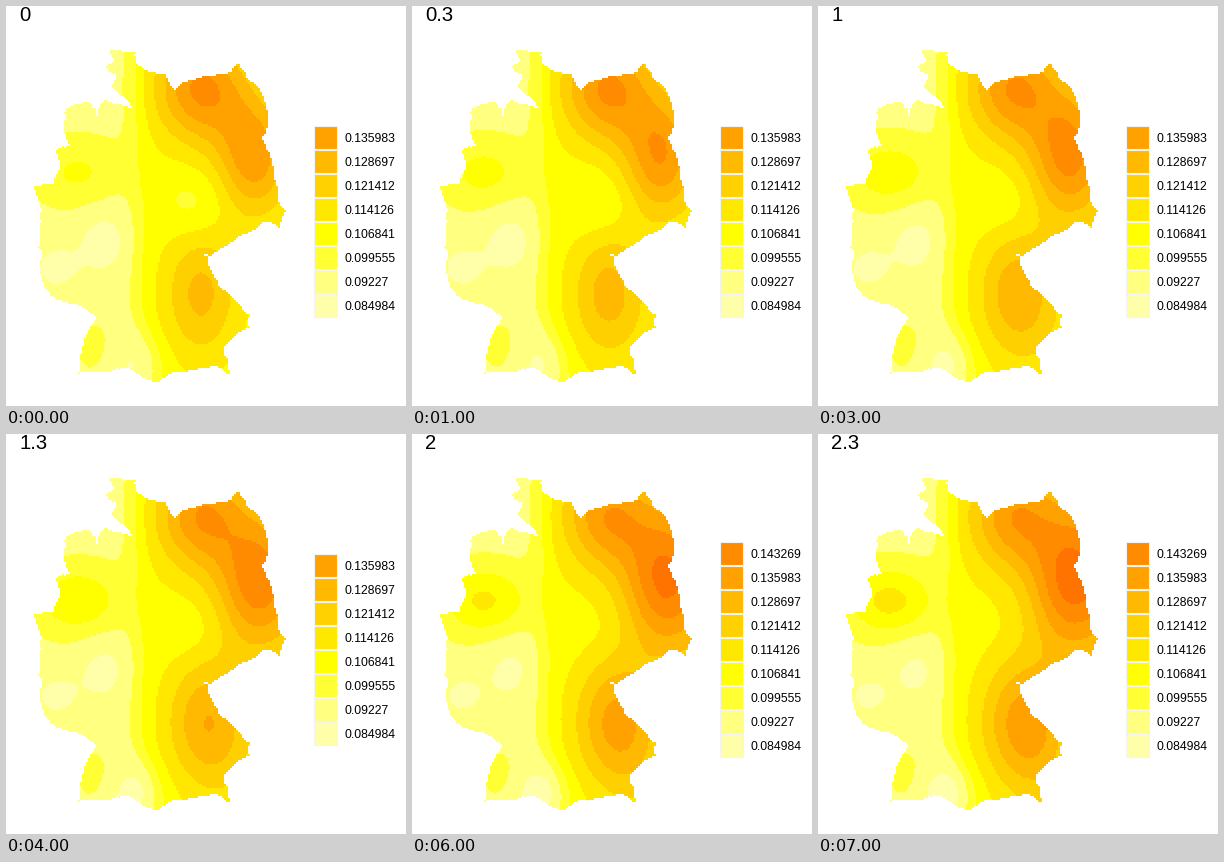
Recreate the animation shown at these times as a matplotlib script. Size 400x400 px, loop 8000 ms.

```python
import random

import matplotlib.pyplot as plt
import numpy as np
from matplotlib.animation import FuncAnimation
from matplotlib.colors import ListedColormap
from matplotlib.patches import Rectangle
from matplotlib.path import Path

SIZE, CELL = 400, 2
FRAMES = 8
LOWEST, HIGHEST = 0.084984, 0.135983
STEP = (HIGHEST - LOWEST) / 7

# Corners of the border, clockwise; the raggedness is generated
NORTH = [(102, 44), (129, 47), (131, 58), (143, 66), (160, 67), (163, 80),
         (169, 83), (183, 75), (197, 69), (222, 67), (233, 55), (240, 70),
         (254, 84)]
EAST = [(263, 120), (256, 132), (264, 150), (273, 197), (279, 205), (273, 222),
        (262, 215), (232, 231), (204, 251), (198, 247), (213, 281), (243, 309),
        (244, 321), (234, 326)]
SOUTH = [(217, 343), (224, 368), (212, 361), (165, 367), (150, 377), (118, 361),
         (103, 366), (73, 367)]
WEST = [(75, 342), (90, 311), (75, 300), (47, 292), (38, 282), (33, 262),
        (38, 250), (33, 240), (35, 206), (28, 181), (48, 177), (55, 160),
        (51, 144), (64, 140), (57, 118), (60, 102), (84, 97), (91, 109),
        (99, 94), (127, 102), (107, 82), (111, 70), (101, 61), (108, 56)]

# Hills and hollows: x, y, width, height, strength at the start and at the end
BUMPS = [
    (195, 82, 32, 38, 4.7, 4.0),
    (248, 150, 26, 42, 4.2, 2.6),
    (275, 140, 42, 70, 0.0, 3.9),
    (190, 198, 24, 24, -1.1, -0.2),
    (195, 288, 26, 45, 2.8, 2.8),
    (225, 305, 25, 55, 0.0, 2.2),
    (72, 167, 32, 25, 1.55, 2.75),
    (98, 235, 20, 26, -1.0, -0.8),
    (50, 262, 17, 17, -0.9, -0.75),
    (88, 342, 15, 22, 0.7, 0.7),
    (128, 358, 20, 18, -0.7, -1.2),
]

PALE = [170, 128, 51]


def band_color(level):
    if level < len(PALE):
        return 1, 1, PALE[level] / 255
    return 1, 1 - (level - 3) / 11, 0


def roughen(points, rng, amount):
    """Split every edge at a jittered midpoint."""
    out = []
    for (x0, y0), (x1, y1) in zip(points, points[1:] + points[:1]):
        out += [(x0, y0), ((x0 + x1) / 2 + rng.uniform(-amount, amount),
                           (y0 + y1) / 2 + rng.uniform(-amount, amount))]
    return out


def sigmoid(u):
    return 1 / (1 + np.exp(-u))


def field(x, y, progress):
    """Band level: a step from west to east plus the bumps."""
    edge = 131 + 20 * sigmoid((y - 325) / 12)
    level = 1.6 + 1.9 * sigmoid((x - edge) / 6)
    for cx, cy, w, h, start, end in BUMPS:
        strength = start + (end - start) * progress
        level += strength * np.exp(-((x - cx) / w) ** 2 / 2
                                   - ((y - cy) / h) ** 2 / 2)
    return level


rng = random.Random(4)
border = NORTH + EAST + SOUTH + WEST
for amount in (1.5, 1.2, 0.8):
    border = roughen(border, rng, amount)

axis = np.arange(CELL / 2, SIZE, CELL)
gx, gy = np.meshgrid(axis, axis)
cells = np.column_stack([gx.ravel(), gy.ravel()])
inside = Path(border + border[:1]).contains_points(cells).reshape(gx.shape)

fig = plt.figure(figsize=(4, 4), dpi=100, facecolor="white")
ax = fig.add_axes([0, 0, 1, 1])
ax.axis("off")

colors = [band_color(k) for k in range(10)]
image = ax.imshow(np.full(gx.shape, np.nan), cmap=ListedColormap(colors),
                  vmin=-0.5, vmax=9.5, interpolation="nearest",
                  extent=(0, SIZE, SIZE, 0))
ax.set(xlim=(0, SIZE), ylim=(SIZE, 0), aspect="auto")

title = ax.text(13.5, 15, "", family="Liberation Sans", size=20.3 * 0.72,
                va="baseline")
keys = []
for k in range(9):
    key = Rectangle((308, 0), 22.5, 23, fc=colors[k], ec="#f4f4ee", lw=0.8)
    ax.add_patch(key)
    label = ax.text(338.5, 0, f"{round(LOWEST + k * STEP, 6):g}",
                    family="Liberation Sans", size=12.2 * 0.72, va="baseline")
    keys.append((key, label))


def update(i):
    time = i / 3
    rows = 8 if time < 2 else 9
    level = np.clip(np.floor(field(gx, gy, i / (FRAMES - 1))), 0, rows)
    image.set_data(np.where(inside, level, np.nan))
    title.set_text(f"{round(time, 1):g}")
    for k, (key, label) in enumerate(keys):
        middle = 215.5 + 12 * (rows - 1) - 24 * k
        key.set_y(middle - 12)
        label.set_y(middle + 4.5)
        key.set_visible(k < rows)
        label.set_visible(k < rows)
    return image, title


anim = FuncAnimation(fig, update, frames=FRAMES, interval=1000, repeat=True,
                     repeat_delay=0, blit=False)
plt.show()
```
